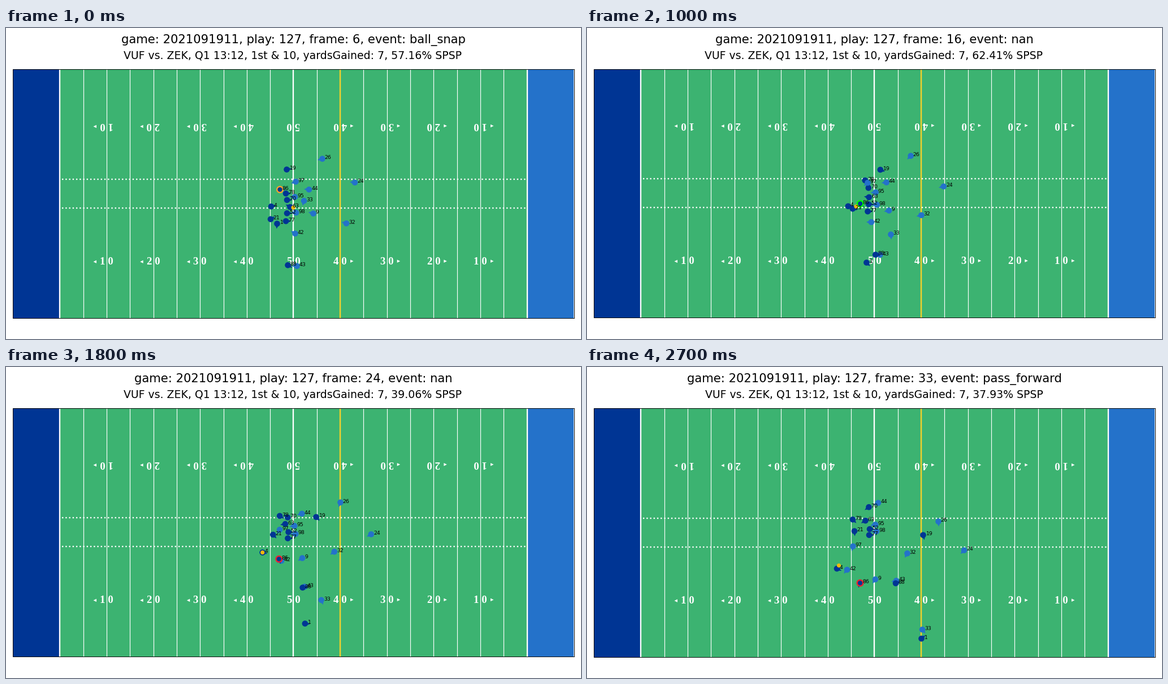
A matplotlib script for the animation above (2800 ms loop, 1017 px wide and 551 px high).

```python
import numpy as np
import matplotlib.pyplot as plt
from matplotlib.animation import FuncAnimation
from matplotlib.patches import Circle, Polygon, Rectangle

W, H, DPI = 1017, 551, 64
SCALE = 84.75 / DPI          # keeps point sizes as for a 12 inch wide figure
FRAMES, STEP = 28, 100
LAST = FRAMES - 1
LEFT, BOTTOM = 12.6, 513.1
YARD = (W - 2 * LEFT) / 120
FIELD_H = 53.3 * YARD

GREEN, NAVY, BLUE = "#3cb371", "#003594", "#2472ca"
YELLOW, BALL = "#f2d026", "#f2b90c"

EVENTS = {0: "ball_snap", 11: "play_action", LAST: "pass_forward"}
RATE_KEYS = [0, 4, 8, 12, 18, 23, 27]
RATES = [57.16, 65.49, 68.94, 55.89, 39.06, 50.82, 37.93]

plt.rcParams["font.family"] = "DejaVu Sans"
fig = plt.figure(figsize=(W / DPI, H / DPI), dpi=DPI, facecolor="white")
ax = fig.add_axes([0, 0, 1, 1])
ax.set_xlim(0, W)
ax.set_ylim(H, 0)
ax.axis("off")


def field_x(yards):
    return LEFT + yards * YARD


def field_y(yards):
    return BOTTOM - yards * YARD


def box(start, end, color):
    ax.add_patch(Rectangle((field_x(start), field_y(53.3)), (end - start) * YARD,
                           FIELD_H, facecolor=color, linewidth=0, zorder=0))


def yard_line(yards, width, color="white"):
    x = field_x(yards)
    ax.plot([x, x], [field_y(0), field_y(53.3)], color=color, zorder=1,
            linewidth=width * SCALE, solid_capstyle="butt")


def arrow(x, y, side):
    ax.add_patch(Polygon([(x + 3 * side, y), (x - 2.5 * side, y - 2.7),
                          (x - 2.5 * side, y + 2.7)], color="white",
                         linewidth=0, zorder=2))


def draw_field():
    box(0, 10, NAVY)
    box(10, 110, GREEN)
    box(110, 120, BLUE)
    for yards in range(10, 111, 5):
        yard_line(yards, 2 if yards in (10, 60, 110) else 1)
    yard_line(70, 2, YELLOW)
    for y in (23.58, 29.72):
        ax.plot([field_x(10.5), field_x(109.8)], [field_y(y)] * 2, ":",
                color="white", linewidth=2 * SCALE, zorder=1)
    for yards in range(20, 101, 10):
        tens = 5 - abs(yards - 60) // 10
        side = np.sign(yards - 60)
        for y, turn in ((12, 0), (41.3, 180)):
            ax.text(field_x(yards), field_y(y), f"{tens} 0", color="white",
                    family="Liberation Serif", weight="bold", rotation=turn,
                    fontsize=16 * SCALE, ha="center", va="center", zorder=2)
            if side:
                arrow(field_x(yards) + 20.4 * side,
                      field_y(y) + (1.5 if turn else -1) - 0.5 * side, side)
    # The border sits just outside the field
    ax.add_patch(Rectangle((LEFT - 0.2, field_y(53.3)), 120 * YARD + 0.4, FIELD_H,
                           fill=False, edgecolor="black", linewidth=0.8 * SCALE,
                           zorder=2))


def ease(t, length):
    return (1 - np.cos(np.pi * min(t / length, 1))) / 2


def arc(start, mid, end):
    """Path with constant acceleration through three points."""
    start, mid, end = map(np.array, (start, mid, end))

    def path(t):
        u = t / LAST
        return ((1 - u) * (1 - 2 * u) * start + 4 * u * (1 - u) * mid
                + u * (2 * u - 1) * end)
    return path


def slide(start, shift):
    """Path of a lineman who gives way and then holds his ground."""
    return lambda t: np.array(start) + ease(t, 24) * np.array(shift)


class Player:
    count = 0

    def __init__(self, number, color, path, face):
        Player.count += 1
        z = 3 + Player.count * 0.01
        self.path, self.face = path, face
        self.pointer = ax.add_patch(Polygon([(0, 0)] * 3, facecolor=color,
                                            linewidth=0, zorder=z))
        self.dot = ax.add_patch(Circle((0, 0), 5.3, facecolor=color,
                                       linewidth=0, zorder=z))
        self.label = ax.text(0, 0, str(number), fontsize=8 * SCALE, zorder=6)

    def move(self, t):
        x, y = self.path(t)
        a = np.radians(np.interp(t, [0, LAST], self.face))
        c, s = np.cos(a), -np.sin(a)
        self.pointer.set_xy([(x + 9 * c, y + 9 * s), (x - 4 * s, y + 4 * c),
                             (x + 4 * s, y - 4 * c)])
        self.dot.center = x, y
        self.label.set_position((x + 4.2, y + 0.7))


def defender(number, path, face=(180, 190)):
    return Player(number, BLUE, path, face)


def attacker(number, path, face=(0, 0)):
    return Player(number, NAVY, path, face)


draw_field()

passer = attacker(4, arc((469, 315.5), (458.5, 320), (442, 356.5)), (10, -25))
players = [
    passer,
    # secondary and linebackers
    defender(26, arc((559.5, 231), (580, 230.5), (621.5, 273)), (195, 275)),
    defender(24, arc((617, 273), (637, 286.5), (667, 324)), (175, 225)),
    defender(44, arc((536, 285.5), (527, 268), (515, 240)), (175, 205)),
    defender(33, arc((527, 305.5), (545, 386.5), (593, 464.5)), (255, 310)),
    defender(9, arc((543.5, 328), (530, 328), (510, 375.5)), (165, 235)),
    defender(32, arc((602, 345.5), (587, 329), (566.5, 329.5)), (165, 240)),
    defender(42, arc((511.5, 363.5), (497, 342), (460, 358.5)), (150, 230)),
    defender(43, arc((514.5, 421), (522, 396), (547, 378))),
    # the two lines
    defender(95, slide((511, 298.5), (-1, -20))),
    defender(98, slide((513, 326.5), (-1, -36))),
    attacker(78, arc((495, 292.5), (489, 266), (470, 269.5)), (0, -45)),
    attacker(70, arc((497, 304), (498, 276), (498.5, 247.5)), (0, 215)),
    attacker(63, slide((502.5, 316.5), (-10, -45)), (150, 210)),
    attacker(52, slide((497, 327.5), (3, -41))),
    attacker(77, slide((495, 341.5), (4, -44.5))),
    defender(97, arc((512.5, 271.5), (491, 279), (470.5, 317)), (200, 255)),
    # backs and receivers
    attacker(21, slide((468, 338), (5, -48)), (30, -85)),
    attacker(19, arc((496.5, 250), (530.5, 256), (594.5, 297)), (10, -75)),
    attacker(1, arc((479.5, 346), (507, 434.5), (591.5, 480.5)), (-95, 40)),
    attacker(88, arc((498.5, 419.5), (516, 396.5), (546, 382.5)), (-30, 20)),
]
runner = attacker(86, arc((484.5, 285.5), (483, 323), (483, 382)), (0, -110))
runner.dot.set_linewidth(2 * SCALE)
players.append(runner)

ball = ax.add_patch(Circle((0, 0), 3.6, facecolor=BALL, linewidth=0, zorder=5))

title = fig.suptitle("", fontsize=18 * SCALE)
subtitle = fig.text(507.5 / W, 1 - 55 / H, "", fontsize=16 * SCALE, ha="center")


def ball_path(t):
    """Snapped to the passer, then raised for the throw."""
    lift = max(0, t - 18) / (LAST - 18)
    hands = passer.path(t) + lift * np.array([3.5, -5.5])
    snap = np.array([508, 317.5])
    return snap + ease(t, 16) * (hands - snap)


def ring_color(rate):
    if rate >= 60:
        return "#00ff00"
    return "#ffa02a" if rate >= 40 else "#f0202c"


def update(t):
    event = EVENTS.get(t, "nan")
    rate = np.interp(t, RATE_KEYS, RATES)
    title.set_text(f"game: 2021091911, play: 127, frame: {t + 6}, event: {event}")
    subtitle.set_text("VUF vs. ZEK, Q1 13:12, 1st & 10, yardsGained: 7, "
                      f"{rate:.2f}% SPSP")
    # A taller title pushes the field down slightly
    drop = 0.7 if t in EVENTS else 0
    ax.set_position([0, -drop / H, 1, 1])
    for player in players:
        player.move(t)
    runner.dot.set_edgecolor(ring_color(rate))
    ball.center = ball_path(t)
    return []


anim = FuncAnimation(fig, update, frames=FRAMES, interval=STEP,
                     init_func=lambda: update(0), repeat=True, repeat_delay=0)
plt.show()
```
